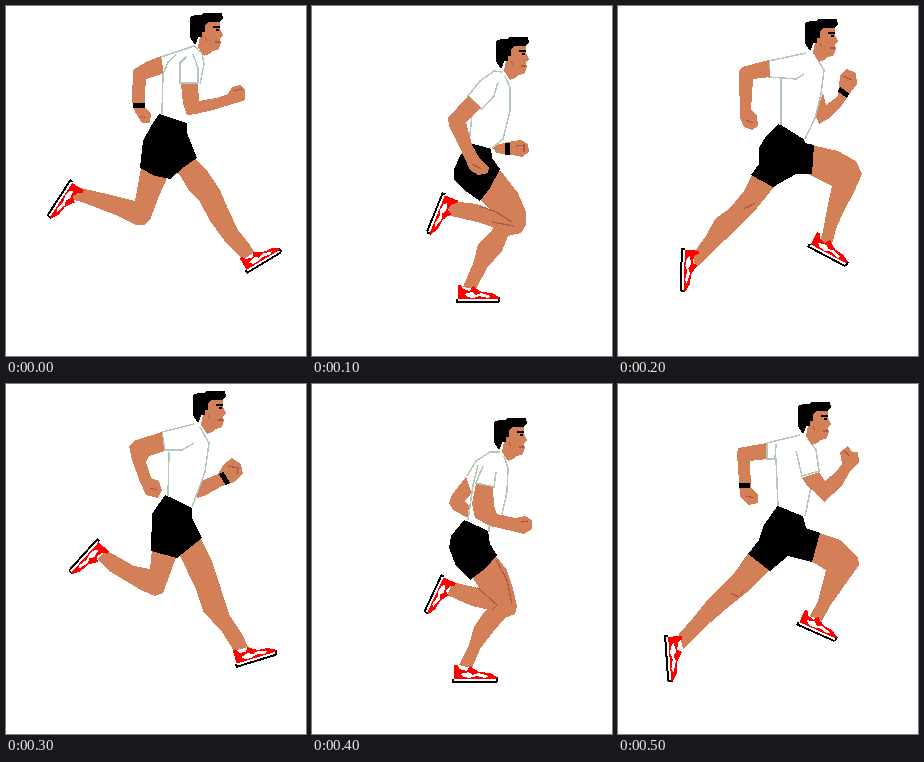
Animation of 300x350 px, one loop 600 ms. Source, as an HTML page:

```html
<!DOCTYPE html>
<html lang="en">
<head>
<meta charset="utf-8">
<title>Runner</title>
<style>
html, body { margin: 0; width: 100%; height: 100%; overflow: hidden; background: #fff; }
svg { display: block; width: 100%; height: 100%; shape-rendering: crispEdges; }
.skin { fill: #d37f57; }
.kit { fill: #000; }
.shirt { fill: #fff; }
.seam { fill: none; stroke: #b3c8b6; stroke-width: 1.5; }
.crease { fill: none; stroke: #a9574a; stroke-width: 1.2; }
.watch { fill: none; stroke: #000; stroke-width: 5; }
.red { fill: #f00; }
.white { fill: #fff; }
.pose { visibility: hidden; animation: show 600ms step-end infinite; animation-delay: calc(var(--i) * 100ms - 600ms); }
@keyframes show {
  0% { visibility: visible; }
  16.66667%, 100% { visibility: hidden; }
}
</style>
</head>
<body>
<svg viewBox="0 0 300 350">
<defs>
  <g id="head">
    <path class="skin" d="M195 17L214 14V23L217 29L214 32L215 37L213 43L207 45L203 48L198 50L192 41L194 30Z"/>
    <path class="kit" d="M184 11L189 9H195L198 7H216L217 13L213 16H202L199 20V26H196V31H192L190 38H188L184 31Z"/>
    <path class="kit" d="M207 20H214V22H207ZM210 23H213V25H210Z"/>
    <path class="crease" d="M209 36H214M199 31L201 35"/>
  </g>
  <!-- Heel at the origin, toe along +x -->
  <g id="shoe">
    <path class="kit" d="M0 -4H2V-2H42V-6H44V-2L42 0H0Z"/>
    <path class="white" d="M2 -5H42V-2H2Z"/>
    <path class="red" d="M2 -18H5L7 -14L14 -12L17 -17L21 -14L26 -11L36 -10L43 -6V-4H2Z"/>
    <path class="white" d="M8 -9L16 -11L20 -8L25 -10L35 -7L32 -5L23 -7L17 -5L11 -6Z"/>
  </g>
</defs>

<g class="pose" style="--i:0">
  <path class="skin" d="M155 50L140 56L127 64L126 95L129 106L136 117L144 117L145 108L139 102V88L140 73L158 67Z"/>
  <path class="watch" d="M127 99H139"/>
  <path class="crease" d="M134 110L140 112"/>
  <path class="skin" d="M135 162L129 195L105 189L75 182L67 178L64 193L76 196L112 210L130 219H138L144 214L153 190L163 168Z"/>
  <path class="skin" d="M163 165L173 168L184 186L194 196L204 215L218 234L237 254L248 246L244 239L232 224L222 203L214 184L200 163L187 151Z"/>
  <path class="kit" d="M153 108L181 117V127L191 152L178 161L164 173L149 170L134 162L137 135L145 120Z"/>
  <path class="shirt" d="M155 50L188 40L197 47V60L193 82L181 117L154 108L158 68Z"/>
  <path class="seam" d="M155 51L188 40L196 47L198 58L194 78M170 49L162 56L157 68L156 108M180 51L174 57V77H192M187 48L192 62V77"/>
  <path class="skin" d="M175 78H192L193 95L210 92L222 88L226 81L234 79L239 83V94L230 97L207 104L190 108L181 109L177 98Z"/>
  <path class="crease" d="M227 85L236 83"/>
  <use href="#head"/>
  <use href="#shoe" transform="translate(64 173) rotate(123)"/>
  <use href="#shoe" transform="translate(241 268) rotate(-31) scale(.95)"/>
</g>

<g class="pose" style="--i:1">
  <path class="skin" d="M180 140L192 137L201 135L209 134L216 138L217 146L210 151L200 149L184 147Z"/>
  <path class="watch" d="M195 137V149"/>
  <path class="crease" d="M204 140L212 139V146"/>
  <path class="skin" d="M139 195L165 198L185 206L196 214L190 224L165 216L135 209Z"/>
  <path class="skin" d="M167 192L188 164L206 187L214 206V219L209 227L196 230L190 245L175 262L164 283L151 281L162 255L166 238L180 224L186 212Z"/>
  <path class="crease" d="M168 200L184 206L200 216M180 216L202 220"/>
  <path class="kit" d="M158 136L179 141L180 152L188 163L178 182L168 195L155 186L142 174V163L148 150Z"/>
  <path class="shirt" d="M182 65L193 68L198 82V105L191 133L180 143L158 137L157 110L156 90Z"/>
  <path class="seam" d="M190 66L182 65L168 75L156 90L170 103L182 90L186 76M193 70L198 82V105L191 133L180 142M160 109L157 137"/>
  <path class="skin" d="M156 90L145 102L136 112L137 120L147 140L153 153L158 164L166 169L176 167L177 161L168 153L160 139L154 116L163 107L169 101Z"/>
  <path class="crease" d="M160 158L169 163"/>
  <use href="#head" y="24"/>
  <use href="#shoe" transform="translate(130 186) rotate(112)"/>
  <use href="#shoe" transform="translate(144 297)"/>
</g>

<g class="pose" style="--i:2">
  <path class="skin" d="M205 87L208 99L220 90L221 82L222 69L229 63L238 67L239 78L230 90L222 102L210 113L201 118L197 108Z"/>
  <path class="watch" d="M221 83L230 90"/>
  <path class="crease" d="M225 70L234 74"/>
  <path class="skin" d="M135 167L126 185L112 202L97 213L88 230L77 245L76 256L80 261L95 245L118 224L139 202L157 180Z"/>
  <path class="skin" d="M194 139L220 145L238 155L244 168L236 186L226 205L219 220L214 238L202 236L205 225L209 203L214 180L190 168Z"/>
  <path class="crease" d="M126 203L137 197"/>
  <path class="kit" d="M160 118L185 127L187 137L196 139L194 168H178L155 181L133 169L141 158V142L148 130Z"/>
  <path class="shirt" d="M151 55L188 46L200 50L207 65L203 90L195 114L187 134L163 119V72H151Z"/>
  <path class="seam" d="M151 55L188 47M151 55V71L178 73L186 68M163 73V119M196 47L206 64L203 88L197 112L187 133"/>
  <path class="skin" d="M151 54L124 61L121 66L122 112L126 121L134 124L140 120L139 110L133 104L135 73L152 71Z"/>
  <path class="crease" d="M128 114L135 117"/>
  <use href="#head" x="3" y="6"/>
  <use href="#shoe" transform="translate(63 242) rotate(92)"/>
  <use href="#shoe" transform="translate(189 241) rotate(28)"/>
</g>

<g class="pose" style="--i:3">
  <path class="skin" d="M193 98L212 90L218 80L226 74L235 80L237 90L228 98L216 102L200 111L191 114Z"/>
  <path class="watch" d="M215 89L222 100"/>
  <path class="crease" d="M222 82L232 84L231 90"/>
  <path class="skin" d="M146 165L144 185L128 182L100 166L91 175L105 188L135 206L149 212L157 209L164 190L171 171Z"/>
  <path class="skin" d="M173 170L190 205L197 227L216 248L228 267L242 263L236 250L224 232L215 205L206 177L194 153Z"/>
  <path class="kit" d="M159 111L186 123V134L196 154L171 174L145 167L146 130Z"/>
  <path class="shirt" d="M156 48L188 40L199 45L203 60L199 88L186 124L162 112L163 68H158Z"/>
  <path class="seam" d="M156 48L188 40M156 48L159 66L176 66L188 59M163 68L162 112M194 43L203 59L199 88L186 123"/>
  <path class="skin" d="M156 48L130 56L123 62L126 76L134 98L140 111L152 114L156 106L153 97L145 94L140 78L143 72L158 67Z"/>
  <path class="crease" d="M144 104L151 106"/>
  <use href="#head" x="3"/>
  <use href="#shoe" transform="translate(91 154) rotate(132)"/>
  <use href="#shoe" transform="translate(230 284) rotate(-17)"/>
</g>

<g class="pose" style="--i:4">
  <path class="skin" d="M156 90L140 111L137 119L141 126L156 134L160 125L153 117L164 104Z"/>
  <path class="skin" d="M141 198L170 205L186 217L182 227L160 222L135 211Z"/>
  <path class="skin" d="M160 193L184 172L195 186L201 205L205 222L203 230L193 234L181 248L168 265L160 284L147 281L157 261L162 243L172 228L182 221L168 205Z"/>
  <path class="crease" d="M184 176L195 196L200 220M165 203L185 221L180 226"/>
  <path class="kit" d="M152 136L176 146L178 160L185 171L174 184L158 196L144 182L137 164L139 152Z"/>
  <path class="shirt" d="M180 67L192 72L196 84L195 105L190 130L176 147L155 137L159 108L154 92L164 76Z"/>
  <path class="seam" d="M188 68H178L164 77L155 92M166 81L161 101L156 136M171 82L164 99L182 103L184 88M192 72L196 84L195 108L190 130M177 142V148"/>
  <path class="skin" d="M164 100L181 103L182 122L185 130L203 134L213 132L220 136V145L212 150L200 147L178 142L163 134L160 120Z"/>
  <path class="crease" d="M209 138L216 137"/>
  <use href="#head" x="-2" y="27"/>
  <use href="#shoe" transform="translate(129 190) rotate(115) scale(.96)"/>
  <use href="#shoe" transform="translate(140 299) scale(1.05 1)"/>
</g>

<g class="pose" style="--i:5">
  <path class="skin" d="M149 59L120 64L119 70L122 112L130 121L140 119V110L133 104L132 77L149 75Z"/>
  <path class="watch" d="M121 101H132"/>
  <path class="crease" d="M128 112L136 114"/>
  <path class="skin" d="M131 168L115 191L91 214L75 234L61 250L65 265L85 245L108 225L128 209L153 184Z"/>
  <path class="skin" d="M202 149L222 156L240 173L241 181L224 205L212 222L204 237L192 232L200 217L208 186L193 177Z"/>
  <path class="crease" d="M113 209L120 213L126 207"/>
  <path class="kit" d="M160 121L185 132L188 144L202 149L194 178L170 172L152 187L130 170L141 156L146 141Z"/>
  <path class="shirt" d="M149 59L182 51L195 56L201 70V88L193 106L187 133L160 122L158 75H149Z"/>
  <path class="seam" d="M149 59L182 51M149 59V75H158L160 122M158 60L157 75M178 67L184 92L201 87L198 66L190 55M193 103L187 132"/>
  <path class="skin" d="M184 94L201 88L207 97L218 88L224 80L222 68L230 62L234 68H240L241 78L232 87L224 102L206 118L198 109L190 103Z"/>
  <path class="crease" d="M226 67L232 72"/>
  <use href="#head" x="-4" y="11"/>
  <use href="#shoe" transform="translate(46 251) rotate(86) scale(1.08 1)"/>
  <use href="#shoe" transform="translate(178 241) rotate(24) scale(.98)"/>
</g>
</svg>
</body>
</html>
```
